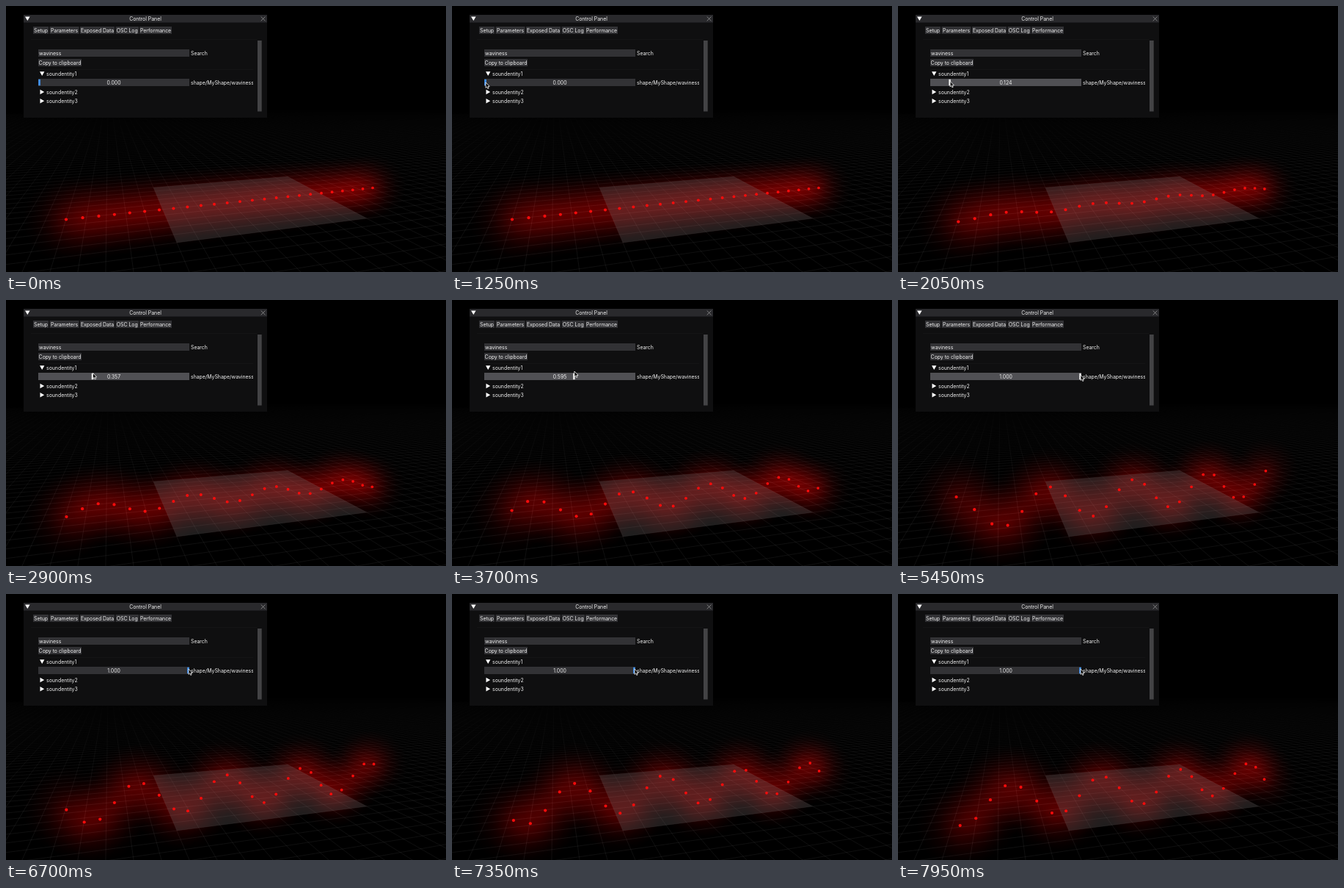
These frames come from a looping animation (600 px wide and 362 px high, 8000 ms). An HTML page with a canvas:

```html
<!DOCTYPE html>
<html lang="en">
<head>
<meta charset="utf-8">
<title>Waviness</title>
<style>
html, body { margin: 0; width: 100%; height: 100%; overflow: hidden; background: #000; }
canvas { display: block; }
</style>
</head>
<body>
<canvas id="stage" width="600" height="362"></canvas>
<script>
const W = 600, H = 362, LOOP = 8000, STEP = 50;
const ctx = document.getElementById('stage').getContext('2d');

function layer(paint) {
  const c = document.createElement('canvas');
  c.width = W;
  c.height = H;
  paint(c.getContext('2d'));
  return c;
}

function poly(g, pts) {
  g.beginPath();
  pts.forEach(([x, y]) => g.lineTo(x, y));
  g.closePath();
}

function box(g, x1, y1, x2, y2, color) {
  g.fillStyle = color;
  g.fillRect(x1, y1, x2 - x1, y2 - y1);
}

function label(g, s, x, y, align = 'left') {
  g.font = '6.9px Inter, Roboto, sans-serif';
  g.textAlign = align;
  g.textBaseline = 'alphabetic';
  g.fillStyle = '#f2f2f2';
  g.fillText(s, x, y + 2.5);
}

// Piecewise linear value over [time, value] pairs
function track(keys, t) {
  if (t <= keys[0][0]) return keys[0][1];
  for (let i = 1; i < keys.length; i++) {
    const [t0, a] = keys[i - 1], [t1, b] = keys[i];
    if (t <= t1) return a + (b - a) * (t - t0) / (t1 - t0);
  }
  return keys[keys.length - 1][1];
}

// Floor lines run to two vanishing points; their dx/dy is evenly spaced.
const floor = layer(g => {
  const fan = (vx, vy, base, gap, from, to) => {
    for (let k = from; k <= to; k++) {
      const m = base + gap * k;
      g.beginPath();
      g.moveTo(vx, vy);
      g.lineTo(vx + m * 290, vy + 290);
      g.stroke();
    }
  };
  g.lineWidth = 0.8;
  g.strokeStyle = 'rgba(255,255,255,0.085)';
  fan(139.4, 103, 0.427, 0.1468, -26, 68);
  fan(1943, 104, -12.18, 0.4337, -75, 17);
  const fade = g.createLinearGradient(0, 140, 0, 290);
  fade.addColorStop(0, 'rgba(0,0,0,0)');
  fade.addColorStop(0.12, 'rgba(0,0,0,0.12)');
  fade.addColorStop(0.5, 'rgba(0,0,0,0.6)');
  fade.addColorStop(1, 'rgba(0,0,0,0.9)');
  g.globalCompositeOperation = 'destination-in';
  g.fillStyle = fade;
  g.fillRect(0, 0, W, H);
});

const panel = layer(g => {
  const grey = '#323235', faint = '#171718';
  box(g, 24, 12, 356, 152, '#0f0f10');
  box(g, 24, 12, 356, 22.5, '#29292c');
  g.fillStyle = '#fff';
  poly(g, [[26, 14.5], [32.6, 14.5], [29.3, 20]]);
  g.fill();
  label(g, 'Control Panel', 190, 17.5, 'center');
  g.strokeStyle = '#a0a0a0';
  g.lineWidth = 0.7;
  g.beginPath();
  g.moveTo(347.7, 14.5);
  g.lineTo(353.5, 20.3);
  g.moveTo(353.5, 14.5);
  g.lineTo(347.7, 20.3);
  g.stroke();

  [['Setup', 37, 58], ['Parameters', 59.5, 99.5], ['Exposed Data', 101, 148],
   ['OSC Log', 149.5, 181], ['Performance', 182, 226]].forEach(([s, a, b]) => {
    box(g, a, 28, b, 38, grey);
    label(g, s, (a + b) / 2, 33, 'center');
  });

  box(g, 34, 45, 342, 45.7, faint);
  box(g, 343, 47, 348.7, 143.5, '#434345');
  box(g, 44, 59, 250, 69, grey);
  label(g, 'waviness', 45, 64);
  label(g, 'Search', 252, 64);
  box(g, 44, 72, 103, 82, grey);
  label(g, 'Copy to clipboard', 73.5, 77, 'center');
  box(g, 44, 86, 337, 86.7, faint);

  g.fillStyle = '#fff';
  poly(g, [[46, 89.3], [52.4, 89.3], [49.2, 95]]);
  g.fill();
  label(g, 'soundentity1', 55, 92);
  [['soundentity2', 117], ['soundentity3', 129.3]].forEach(([s, y]) => {
    g.fillStyle = '#fff';
    poly(g, [[46.5, y - 3.2], [52.2, y], [46.5, y + 3.2]]);
    g.fill();
    label(g, s, 55, y);
  });
  g.save();
  g.beginPath();
  g.rect(250, 98, 87, 12);
  g.clip();
  label(g, 'shape/MyShape/waviness', 252, 104);
  g.restore();
});

const PRESS = 1600, RELEASE = 5800;
const amount = [[PRESS, 0], [2900, 0.357], [4450, 0.819], [5100, 1]];
const pointerY = [[350, 32], [850, 104], [PRESS, 104], [2900, 99.5], [3400, 95], [4450, 102]];

function placeDots(t, wave) {
  const dots = [];
  for (let i = 0; i < 25; i++) {
    const w = 1 + 0.01289 * i;
    const x = (82 + 23.86 * i) / w;
    const dy = -25 * wave * Math.cos(i + t / 1000 - 5) / w;
    dots.push([x + dy * (300 - x) * 0.0005, 290.5 - 0.1029 * (x - 82) + dy, w]);
  }
  return dots;
}

function drawGlow(dots) {
  ctx.globalCompositeOperation = 'lighter';
  dots.forEach(([x, y, w]) => {
    const r = 60 / w;
    const glow = ctx.createRadialGradient(x, y, 0, x, y, r);
    glow.addColorStop(0, 'rgba(255,0,0,0.16)');
    glow.addColorStop(0.5, 'rgba(255,0,0,0.06)');
    glow.addColorStop(0.8, 'rgba(255,0,0,0.016)');
    glow.addColorStop(1, 'rgba(255,0,0,0)');
    ctx.fillStyle = glow;
    ctx.fillRect(x - r, y - r, 2 * r, 2 * r);
  });
  ctx.globalCompositeOperation = 'source-over';
}

function drawPlate() {
  poly(ctx, [[201, 247], [384, 232], [492, 289], [233, 322]]);
  ctx.fillStyle = 'rgba(115,112,112,0.27)';
  ctx.fill();
}

function drawDots(dots) {
  ctx.fillStyle = '#fa0c0c';
  dots.forEach(([x, y, w]) => {
    ctx.beginPath();
    ctx.arc(x, y, 2.1 / Math.sqrt(w), 0, 7);
    ctx.fill();
  });
}

function drawSlider(t, wave) {
  const held = t >= PRESS && t < RELEASE;
  const x = 45.5 + 203 * wave;
  box(ctx, 44, 99, 250, 109, held ? '#505054' : '#323235');
  box(ctx, x - 1.3, 99.8, x + 1.3, 108.2, held ? '#e6e6e6' : '#4296fa');
  label(ctx, wave.toFixed(3), 147, 104, 'center');
  return x;
}

function drawPointer(x, y) {
  ctx.save();
  ctx.translate(x, y);
  poly(ctx, [[0, 0], [0, 7.4], [1.7, 5.9], [2.8, 8.5], [4.1, 7.9], [3, 5.5], [5.2, 5.4]]);
  ctx.fillStyle = '#000';
  ctx.fill();
  ctx.strokeStyle = '#fff';
  ctx.lineWidth = 0.8;
  ctx.stroke();
  ctx.restore();
}

function draw(t) {
  const wave = track(amount, t);
  const dots = placeDots(t, wave);
  ctx.fillStyle = '#000';
  ctx.fillRect(0, 0, W, H);
  ctx.drawImage(floor, 0, 0);
  drawGlow(dots);
  drawPlate();
  drawDots(dots);
  ctx.drawImage(panel, 0, 0);
  const grab = drawSlider(t, wave);
  if (t >= 350) {
    const x = t < 850 ? track([[350, -4], [850, 45.5]], t) : grab + 0.5;
    drawPointer(x, track(pointerY, t));
  }
}

const start = performance.now();
function tick() {
  const t = (performance.now() - start) % LOOP;
  draw(Math.floor(t / STEP) * STEP);
  requestAnimationFrame(tick);
}
tick();
</script>
</body>
</html>
```
